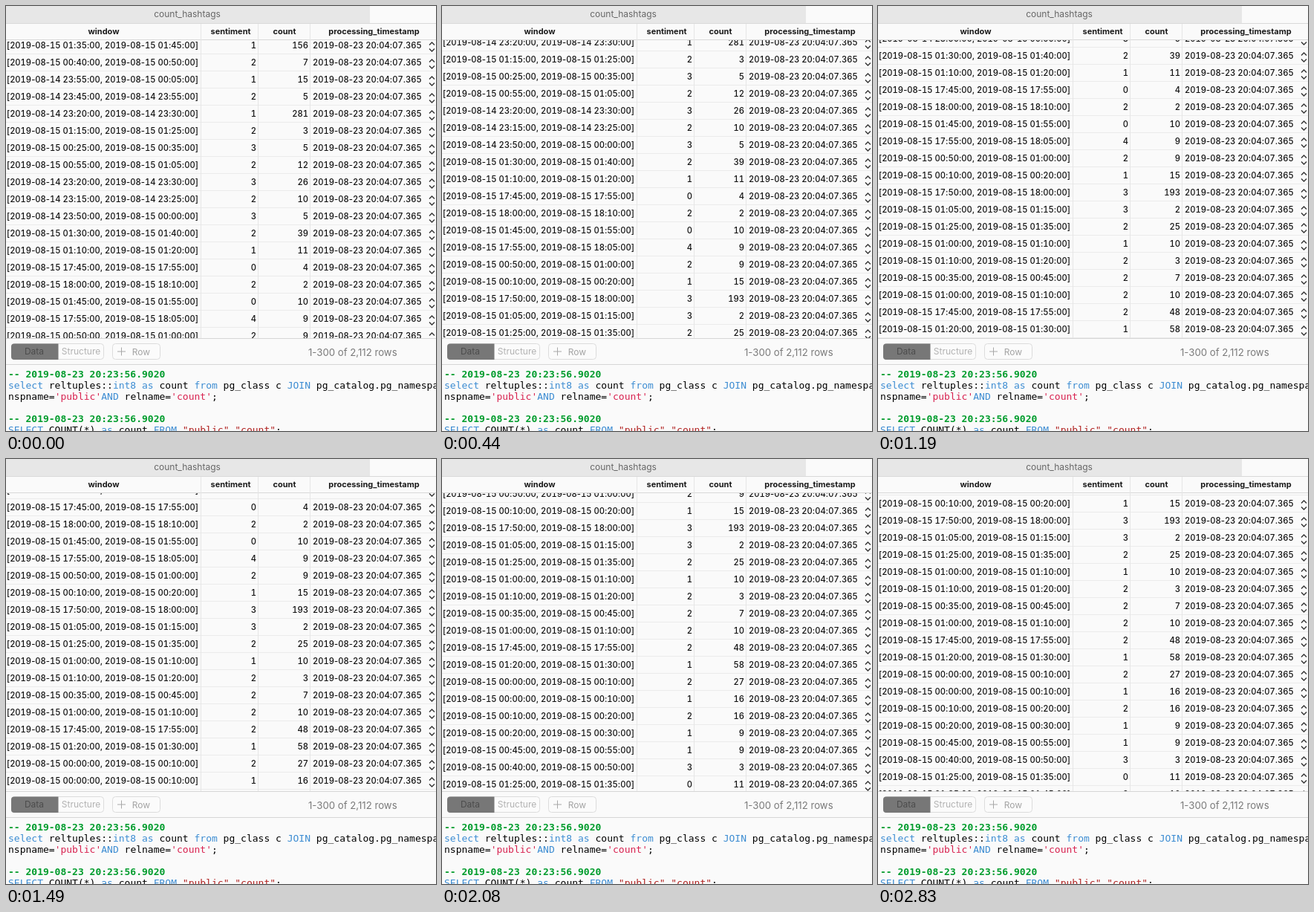
Write an HTML page that moves like this. It is 579x572 px and loops after 2980 ms.

```html
<!DOCTYPE html>
<html lang="en">
<head>
<meta charset="utf-8">
<title>count_hashtags</title>
<style>
html, body { margin: 0; width: 100%; height: 100%; overflow: hidden; background: #fafafa; }
svg { display: block; width: 579px; height: 572px; }
text { font-family: Inter, sans-serif; white-space: pre; }
.cell { font-size: 11.2px; font-weight: 500; fill: #111; }
.num { font-feature-settings: "tnum"; }
.head { font-size: 11px; font-weight: 700; text-anchor: middle; fill: #1c1c1c; }
.ui { font-size: 12px; }
.total { font-size: 13.2px; }
.code { font: 13px "DejaVu Sans Mono", monospace; fill: #000; }
.key { fill: #3c8cd2; }
.str { fill: #d8214f; }
.id { fill: #b0201f; }
.note { fill: #009c2c; font-weight: bold; }
</style>
</head>
<body>
<svg viewBox="0 0 579 572" xmlns="http://www.w3.org/2000/svg">
  <defs><clipPath id="view"><rect y="46" width="579" height="401"/></clipPath></defs>
  <rect width="579" height="572" fill="#fafafa"/>
  <rect width="490" height="23" fill="#e7e7e7"/>
  <rect y="23" width="579" height="1" fill="#d9d9d9"/>
  <text class="ui" x="244" y="15" text-anchor="middle" fill="#676767">count_hashtags</text>
  <g id="heads"></g>
  <g clip-path="url(#view)"><g id="rows"></g></g>
  <g id="rules"></g>
  <g id="bar">
    <rect y="447" width="579" height="36" fill="#fafafa"/>
    <path d="M0 447.5H579M0 482.5H579" stroke="#d6d6d6"/>
    <rect x="7.5" y="454.5" width="124" height="21" rx="4" fill="#fbfbfb" stroke="#dcdcdc"/>
    <path d="M70.5 454.5H11a4 4 0 0 0-4 4V472a4 4 0 0 0 4 4H70.5Z" fill="#777"/>
    <rect x="143.5" y="454.5" width="64" height="21" rx="4" fill="#fbfbfb" stroke="#dcdcdc"/>
    <path d="M150 465H161M155.5 459.5V470.5" stroke="#a8a8a8" fill="none"/>
    <text class="ui" x="38" y="469" text-anchor="middle" fill="#4c4c4c">Data</text>
    <text class="ui" x="101" y="469" text-anchor="middle" fill="#b2b2b2">Structure</text>
    <text class="ui" x="182" y="470" text-anchor="middle" fill="#a4a4a4">Row</text>
    <text class="total" x="407" y="471" fill="#7a7a7a">1-300 of 2,112 rows</text>
  </g>
  <g id="log"></g>
</svg>
<script>
const NS = "http://www.w3.org/2000/svg";
const $ = id => document.getElementById(id);

function add(parent, tag, attrs, text) {
  const el = document.createElementNS(NS, tag);
  for (const k in attrs) el.setAttribute(k, attrs[k]);
  if (text) el.textContent = text;
  parent.appendChild(el);
  return el;
}

// start of the ten-minute window, sentiment, count; "-" marks the day before
const DATA = `01:35 1 156|00:40 2 7|-23:55 1 15|-23:45 2 5|-23:20 1 281|01:15 2 3|00:25 3 5|
00:55 2 12|-23:20 3 26|-23:15 2 10|-23:50 3 5|01:30 2 39|01:10 1 11|17:45 0 4|18:00 2 2|
01:45 0 10|17:55 4 9|00:50 2 9|00:10 1 15|17:50 3 193|01:05 3 2|01:25 2 25|01:00 1 10|
01:10 2 3|00:35 2 7|01:00 2 10|17:45 2 48|01:20 1 58|00:00 2 27|00:00 1 16|00:10 2 16|
00:20 1 9|00:45 1 9|00:40 3 3|01:25 0 11|01:35 2 10`.split("|");
const PITCH = 23, FIRST = 53;

const two = n => String(n).padStart(2, "0");
function stamp(min) {
  const day = 14 + Math.floor(min / 1440), m = min % 1440;
  return `2019-08-${day} ${two(Math.floor(m / 60))}:${two(m % 60)}:00`;
}

// digits are tabular, punctuation keeps its natural width
function cell(x, y, text, end) {
  const el = add($("rows"), "text", { class: "cell", x, y, "text-anchor": end ? "end" : "start" });
  for (const run of text.match(/\d+|\D+/g))
    add(el, "tspan", { class: /\d/.test(run) ? "num" : "" }, run);
}

DATA.forEach((line, i) => {
  const [time, mood, count] = line.trim().split(" ");
  const [h, m] = time.replace("-", "").split(":").map(Number);
  const from = h * 60 + m + (time[0] === "-" ? 0 : 1440);
  const c = FIRST + i * PITCH, y = c + 4;
  cell(1, y, `[${stamp(from)}, ${stamp(from + 10)}]`);
  cell(337, y, mood, true);
  cell(407, y, count, true);
  cell(413, y, "2019-08-23 20:04:07.365");
  add($("rows"), "path", {
    d: `M570 ${c - 0.5}l3.5 -3.5l3.5 3.5M570 ${c + 4.5}l3.5 3.5l3.5 -3.5`,
    fill: "none", stroke: "#333", "stroke-width": 1.4
  });
  add($("rows"), "rect", { y: c + 11, width: 579, height: 1, fill: "#ebebeb" });
});

[["window", 131.5], ["sentiment", 302.5], ["count", 375], ["processing_timestamp", 495.5]]
  .forEach(([name, x]) => add($("heads"), "text", { class: "head", x, y: 38 }, name));
add($("rules"), "rect", { y: 45, width: 579, height: 1, fill: "#d9d9d9" });
for (const x of [262, 339, 409])
  add($("rules"), "rect", { x, y: 24, width: 1, height: 423, fill: "#e6e6e6" });

// [class, text] runs per console line
const LOG = [
  [500, ["note", "-- 2019-08-23 20:23:56.9020"]],
  [515, ["key", "select"], ["", " reltuples::"], ["key", "int8"], ["", " "], ["key", "as"],
    ["", " count "], ["key", "from"], ["", " pg_class c "], ["key", "JOIN"],
    ["", " pg_catalog.pg_namespace"]],
  [530, ["", "nspname="], ["str", "'public'"], ["key", "AND"], ["", " relname="],
    ["str", "'count'"], ["", ";"]],
  [560, ["note", "-- 2019-08-23 20:23:56.9020"]],
  [575, ["key", "SELECT"], ["", " COUNT(*) "], ["key", "as"], ["", " count "], ["key", "FROM"],
    ["", " "], ["id", '"public"'], ["", "."], ["id", '"count"'], ["", ";"]]
];
for (const [y, ...runs] of LOG) {
  const line = add($("log"), "text", { class: "code", x: 3, y });
  for (const [cls, text] of runs) add(line, "tspan", { class: cls }, text);
}

// the list jumps to each offset and rests there until the next time
const LOOP = 2980;
const STEPS = [[0, 0], [150, 22], [290, 54], [440, 96], [590, 153], [740, 200], [890, 214],
  [1040, 219], [1190, 239], [1340, 258], [1490, 287], [1640, 311], [1790, 348], [1930, 380],
  [2080, 397], [2230, 406], [2380, 407]];

function draw(t) {
  let offset = 0;
  for (const [at, y] of STEPS) if (t >= at) offset = y;
  $("rows").setAttribute("transform", `translate(0 ${-offset})`);
}

function tick() {
  draw(performance.now() % LOOP);
  requestAnimationFrame(tick);
}
draw(0);
tick();
</script>
</body>
</html>
```
